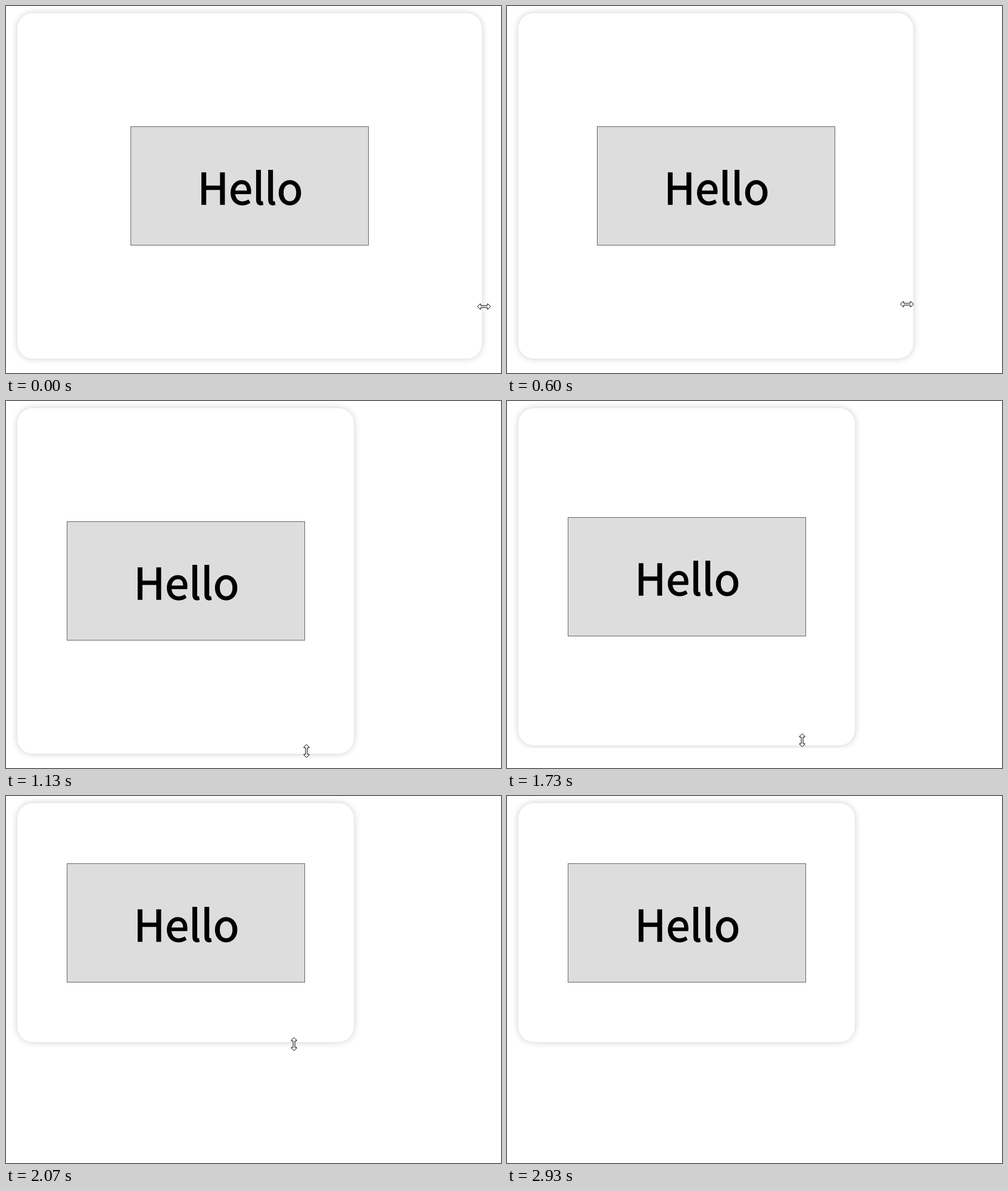
Write an HTML page that moves like this. It is 831x616 px and loops after 3.47 s.

```html
<!DOCTYPE html>
<html lang="en">
<head>
<meta charset="utf-8">
<title>Resizable card</title>
<style>
  html, body { margin: 0; width: 100%; height: 100%; overflow: hidden; background: #fff; }
  #view { position: absolute; left: 0; top: 0; width: 831px; height: 616px; overflow: hidden; }
  #card {
    position: absolute; left: 19px; top: 12px; border-radius: 26px;
    background: #fff; box-shadow: 0 0 12px rgba(0, 0, 0, .2);
  }
  #box {
    position: absolute; width: 400px; height: 200px; box-sizing: border-box;
    border: 1px solid #666; background: #ddd;
  }
  #box svg { position: absolute; left: -1px; top: -1px; }
  text {
    font: 400 72px "Noto Sans CJK JP", "Noto Sans CJK SC", "Noto Sans CJK", sans-serif;
    text-anchor: middle; stroke: #000; stroke-width: 1.4px;
  }
  #pointer { position: absolute; left: 0; top: 0; overflow: visible; }
  #pointer path { fill: #fff; stroke: #000; stroke-width: 1; stroke-linejoin: round; }
</style>
</head>
<body>
<div id="view">
  <div id="card"></div>
  <div id="box"><svg width="400" height="200"><text x="201" y="131">Hello</text></svg></div>
</div>
<svg id="pointer" width="1" height="1"><path/></svg>
<script>
const LOOP = 3470;
const LEFT = 19, TOP = 12;
const byId = id => document.getElementById(id);
const view = byId('view'), card = byId('card'), box = byId('box');
const shape = document.querySelector('#pointer path');

const double = 'M-11 0L-6.5-4.5H-5.5V-1.5H5.5V-4.5H6.5L11 0L6.5 4.5H5.5V1.5H-5.5V4.5H-6.5Z';
const shapes = {
  ew: [double, 0],
  ns: [double, 90],
  arrow: ['M0 0V16L3.7 12.5L6.2 18.3L8.6 17.3L6.1 11.6H11.3Z', 0]
};

// Each move: start time, then one pose about every 67 ms.
// Pose: pointer kind, x, y, and optionally card edge and visible height.
const moves = [
  { start: 0, poses: [['ew', 802.5, 504.5]] },
  { start: 130, poses: [['ew', 801.5, 504.5]] },
  { start: 400, edge: 'right', poses: [
    ['ew', 798.5, 504.5, 797], ['ew', 765.5, 503.5, 770],
    ['ew', 718.5, 501.5, 727], ['ew', 671.5, 500.5, 682],
    ['ew', 636.5, 499.5, 645], ['ew', 607.5, 498.5, 613],
    ['ew', 590.5, 498.5, 592], ['ew', 586.5, 498.5, 584]] },
  { start: 1000, poses: [
    ['arrow', 574.5, 511.5], ['arrow', 538.5, 553.5], ['ns', 504.5, 587.5],
    ['ns', 495.5, 594.5], ['ns', 492.5, 595.5], ['ns', 492.5, 594.5]] },
  { start: 1600, edge: 'bottom', poses: [
    ['ns', 492.5, 592.5, 591], ['ns', 494.5, 585.5, 587],
    ['ns', 495.5, 569.5, 578, 583], ['ns', 495.5, 541.5, 552, 551],
    ['ns', 494.5, 504.5, 516, 515], ['ns', 490.5, 462.5, 472, 472],
    ['ns', 485.5, 426.5, 430, 434], ['ns', 483.5, 416.5, 413]] },
  { start: 2466, poses: [
    ['ns', 482.5, 423.5], ['arrow', 474.5, 445.5], ['arrow', 462.5, 480.5],
    ['arrow', 450.5, 515.5], ['arrow', 441.5, 548.5], ['arrow', 434.5, 575.5],
    ['arrow', 430.5, 591.5], ['none', 0, 0]] }
];

// Flatten into a timeline where card edges carry over from step to step.
const steps = [];
const size = { right: 799, bottom: 592 };
for (const { start, edge, poses } of moves) {
  poses.forEach(([kind, x, y, at, clip = 616], i) => {
    if (edge) size[edge] = at;
    const time = Math.round((start + i * 200 / 3) / 10) * 10;
    steps.push({ time, kind, x, y, clip, ...size });
  });
}

function draw(now) {
  const t = now % LOOP;
  const s = steps.filter(step => step.time <= t).pop();
  const w = s.right - LEFT, h = s.bottom - TOP;
  card.style.width = w + 'px';
  card.style.height = h + 'px';
  box.style.left = Math.round(LEFT + w / 2 - 200) + 'px';
  box.style.top = Math.round(TOP + h / 2 - 100) + 'px';
  view.style.height = s.clip + 'px';
  const look = shapes[s.kind];
  shape.style.display = look ? '' : 'none';
  if (look) {
    shape.setAttribute('d', look[0]);
    shape.setAttribute('transform', `translate(${s.x} ${s.y}) rotate(${look[1]})`);
  }
}

const begin = performance.now();
function tick() {
  draw(performance.now() - begin);
  requestAnimationFrame(tick);
}
tick();
</script>
</body>
</html>
```
